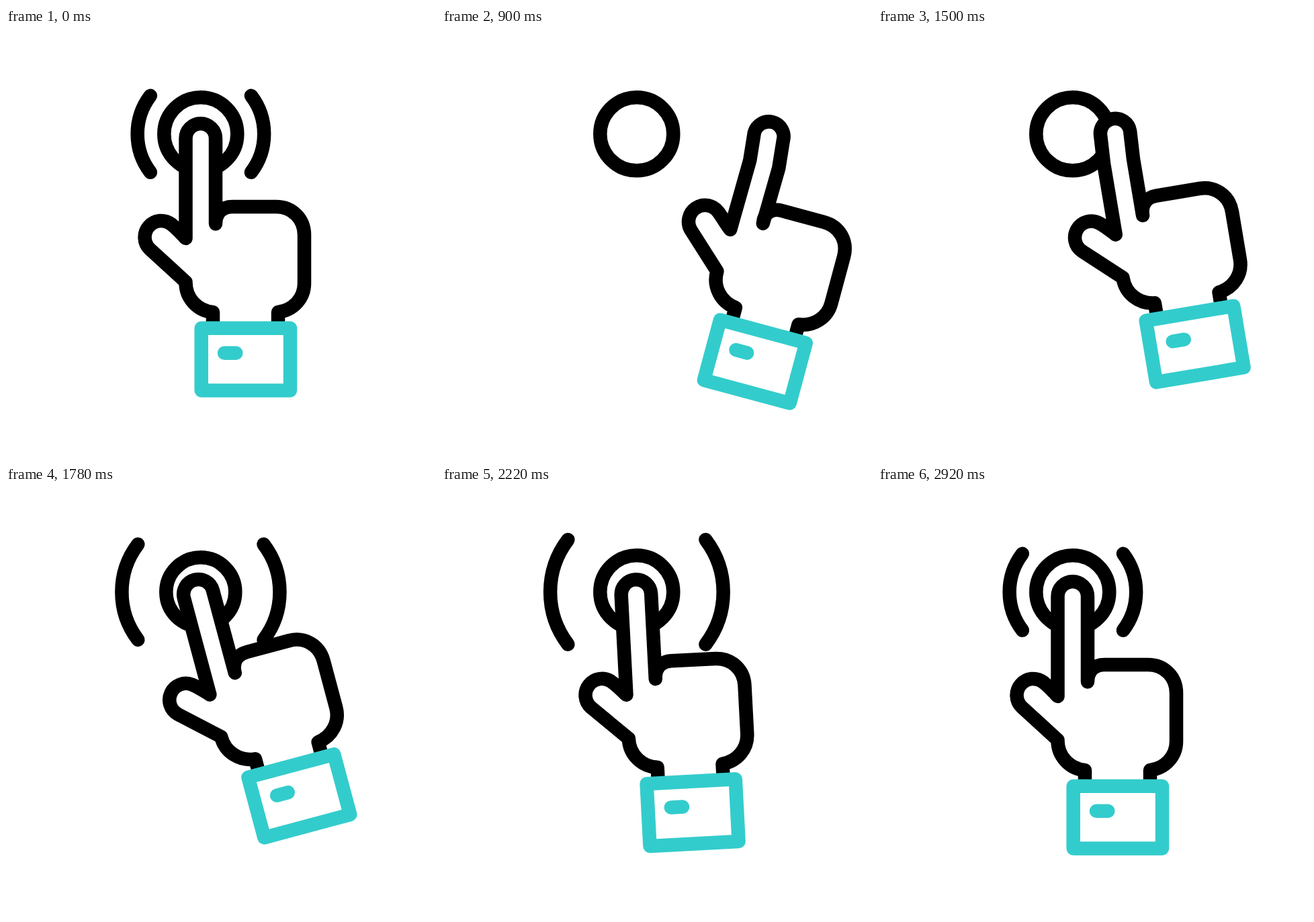
An HTML page that plays this animation: 640 px wide and 640 px high, repeating every 3400 ms.

```html
<!DOCTYPE html>
<html lang="en">
<head>
<meta charset="utf-8">
<title>Tapping hand</title>
<style>
  html, body { margin: 0; width: 100%; height: 100%; overflow: hidden; background: #fff; }
  svg { display: block; width: 100%; height: 100%; }
  path, rect, circle {
    fill: #fff; stroke: #000; stroke-width: 20.5;
    stroke-linecap: round; stroke-linejoin: round;
  }
  #waves path { fill: none; vector-effect: non-scaling-stroke; }
  #cuff * { stroke: #3cc; }
</style>
</head>
<body>
<svg viewBox="0 0 640 640">
  <g id="waves">
    <path d="M-75-57A94 94 0 0 0-75 57"/>
    <path d="M75-57A94 94 0 0 1 75 57"/>
  </g>
  <circle id="button" cx="289.8" cy="157.8" r="54.5"/>
  <g id="hand">
    <path id="palm"/>
    <g id="cuff">
      <rect x="290.7" y="446.7" width="132.3" height="92.8"/>
      <path d="M325 483.8H342.3"/>
    </g>
  </g>
</svg>
<script>
const LOOP = 3400;
const $ = id => document.getElementById(id);
const waves = $('waves'), button = $('button'), hand = $('hand'), palm = $('palm');

const progress = (t, from, to) => Math.min(1, Math.max(0, (t - from) / (to - from)));
const sine = (t, from, to) => (1 - Math.cos(Math.PI * progress(t, from, to))) / 2;
const cubic = (t, from, to) => {
  const p = progress(t, from, to);
  return p < .5 ? 4 * p ** 3 : 1 - 4 * (1 - p) ** 3;
};
const hump = (t, from, to) => Math.sin(Math.PI * progress(t, from, to));

// base, knuckle and tip are sideways shifts of the index finger
function palmPath(base, knuckle, tip) {
  const left = 267.5, right = 312;
  return `M308 440V423C285 421 267 402 267.5 378L214 329
    A24.5 24.5 0 0 1 246 292C254 298 261 306 ${left + base} 313
    L${left + knuckle} 206L${left + tip} 164.5
    A22.25 22.25 0 0 1 ${right + tip} 164.5
    L${right + knuckle} 206L${right + base} 291.5
    C312 276 322 266 337 266H402C426 266 444 284 444 308
    V380C444 402 428 420 405 423V440`;
}

function drawHand(t) {
  const away = cubic(t, 400, 980), settle = sine(t, 1780, 2420), rest = sine(t, 2420, 2900);
  const x = 289 + 199 * away - 203 * sine(t, 1020, 1800) + 4 * settle;
  const y = 163 - 3 * away - 12.5 * hump(t, 980, 1560) + 3 * rest;
  const angle = 15.2 * away - 30.2 * sine(t, 990, 1700) + 15.4 * settle - .4 * rest;
  hand.setAttribute('transform', `translate(${x} ${y}) rotate(${angle}) translate(-289 -163)`);

  const lean = sine(t, 600, 900) - sine(t, 980, 1200);
  const tip = -6 * sine(t, 400, 620) + 6 * sine(t, 700, 900)
    + 2.8 * (sine(t, 980, 1220) - sine(t, 1400, 1700));
  palm.setAttribute('d', palmPath(3 * lean, 4.3 * lean, tip));
}

function drawWaves(t) {
  let scale = 1, opacity = 1;
  if (t >= 400 && t < 2560) {
    const start = t < 1600 ? 400 : t < 2020 ? 1667 : 2052;
    const p = (t - start) / 300;
    scale = 1 + .65 * Math.max(0, p);
    const fadeIn = start === 400 ? 1 : progress(p, -.1, .1);
    opacity = fadeIn * (1 - progress(p, .8, 1.03));
  } else if (t >= 2560 && t < 2920) {
    scale = .85 + .15 * sine(t, 2560, 2900);
    opacity = progress(t, 2560, 2760);
  }
  waves.setAttribute('transform', `translate(289.9 157.8) scale(${scale})`);
  waves.setAttribute('opacity', opacity);
}

function draw(now) {
  const t = now % LOOP;
  drawWaves(t);
  button.setAttribute('r', 54.5 + 3.2 * hump(t, 400, 720) - 3 * hump(t, 1660, 1900));
  drawHand(t);
  requestAnimationFrame(draw);
}
draw(0);
</script>
</body>
</html>
```
